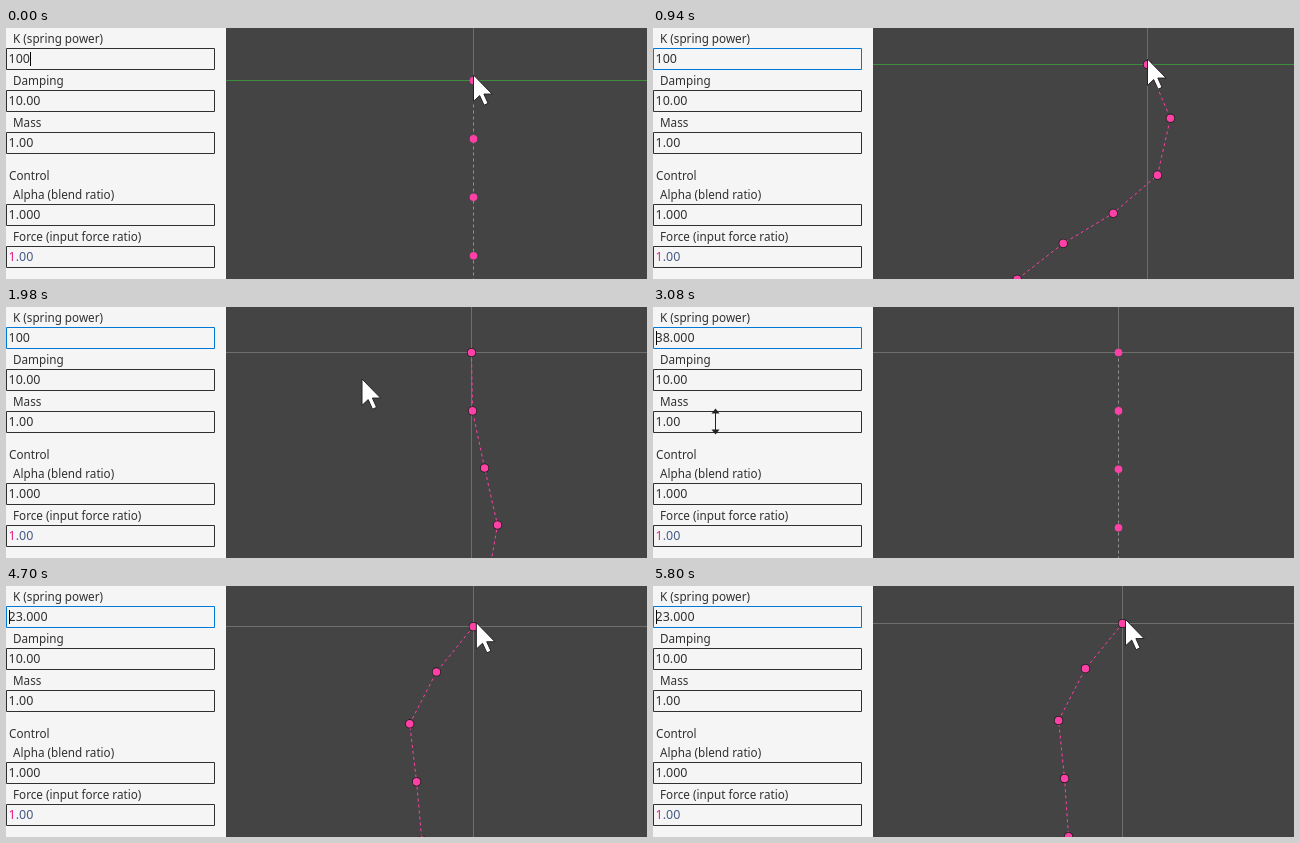
Write an HTML page with a canvas that moves like this. It is 641 px wide and 251 px high and loops after 5.88 s.

```html
<!DOCTYPE html>
<html lang="en">
<head>
<meta charset="utf-8">
<title>Spring chain</title>
<style>
html, body { margin: 0; width: 100%; height: 100%; overflow: hidden; background: #444; }
canvas { display: block; }
</style>
</head>
<body>
<canvas id="stage" width="641" height="251"></canvas>
<script>
const ctx = document.getElementById('stage').getContext('2d');
const W = 641, H = 251, PANEL = 220, LOOP = 5880, FRAME = 73.5;
const LINK = 58.4;
const PINK = '#ff40a6', GREY = '#6e6e6e', GREEN = '#3f8c3f', DARK = '#444444';
const INK = '#303030', PAPER = '#f5f5f5';

// time, handle x, handle y, then the angle of each link from vertical (degrees)
const CHAIN = [
  [0, 467, 52],
  [330, 370, 48, 55, 45, 20, 5, 0],
  [700, 522, 38, -38, -55, -55, -45, -30],
  [940, 494, 36, 23.1, -12.8, -49.2, -59, -52],
  [1250, 385, 42, 57, 45, 10, -20, -30],
  [1600, 515, 45, -48, -35, 10, 25, 20],
  [1830, 465, 45, 15, -12, -25, -28, -30],
  [1980, 465, 45, 1, 11.9, 12.8, -10, -25],
  [2160, 465, 45, -1, -5, -3, 6, 10],
  [2380, 465, 45, 0, 2, 1, -2, -3],
  [2600, 465, 45],
  [3720, 465, 45],
  [3960, 415, 45, 25, 8, 1],
  [4180, 334, 43, 57.7, 53.3, 24.4, 7.9, 3.7],
  [4730, 468, 40, -40, -28, 6, 5, 3],
  [5280, 339, 37, 47, 40, -3, 0, 9],
  [5800, 469, 37, -39.4, -27.4, 5.9, 3.9, 2]
];

// time, x, y of the pointer while it is away from the handle
const POINTER = [
  [1830, 465, 40], [1980, 356, 72], [2350, 62, 30], [2480, 62, 30],
  [3080, 62, 114], [3220, 62, 134], [3310, 62, 134], [3720, 468, 41]
];

const value = (row, col) => row[col] || 0;

function slope(keys, i, col) {
  return (value(keys[i + 1], col) - value(keys[i], col)) / (keys[i + 1][0] - keys[i][0]);
}

// Flat at extremes and holds, smooth elsewhere
function tangent(keys, i, col) {
  if (i === 0 || i === keys.length - 1) return 0;
  const a = slope(keys, i - 1, col), b = slope(keys, i, col);
  return a * b <= 0 ? 0 : 2 * a * b / (a + b);
}

function sample(keys, t, col) {
  const last = keys.length - 1;
  if (t <= keys[0][0]) return value(keys[0], col);
  if (t >= keys[last][0]) return value(keys[last], col);
  let i = 0;
  while (keys[i + 1][0] <= t) i++;
  const span = keys[i + 1][0] - keys[i][0], u = (t - keys[i][0]) / span;
  const u2 = u * u, u3 = u2 * u;
  return (2 * u3 - 3 * u2 + 1) * value(keys[i], col)
    + (u3 - 2 * u2 + u) * span * tangent(keys, i, col)
    + (3 * u2 - 2 * u3) * value(keys[i + 1], col)
    + (u3 - u2) * span * tangent(keys, i + 1, col);
}

function rect(x, y, w, h, color) {
  ctx.fillStyle = color;
  ctx.fillRect(x, y, w, h);
}

function text(str, x, y, size, color = INK) {
  ctx.font = size + 'px "Noto Sans", sans-serif';
  ctx.fillStyle = color;
  ctx.fillText(str, x, y);
  return ctx.measureText(str).width;
}

function field(label, str, top, border = INK) {
  text(label, 7, top - 5, 11.7);
  ctx.strokeStyle = border;
  ctx.lineWidth = 1;
  ctx.strokeRect(0.5, top + 0.5, 208, 21);
  if (str) text(str, 2.5, top + 15, 12.5);
}

function caretVisible(t) {
  if (t >= 2560 && t < 3770) return true;
  const phase = t < 2560 ? t : t - 4300 + 1060;
  return phase % 1060 < 530;
}

function drawPanel(t, k) {
  const scrubbed = t > 2480;
  rect(0, 0, PANEL, H, PAPER);
  field('K (spring power)', scrubbed ? k.toFixed(3) : '100', 20, t < 60 ? INK : '#0078d7');
  field('Damping', '10.00', 62);
  field('Mass', '1.00', 104);
  text('Control', 3, 152, 11.7);
  field('Alpha (blend ratio)', '1.000', 176);
  field('Force (input force ratio)', '', 218);
  const w = text('1', 2.5, 233, 12.5, '#e0208c');
  text('.00', 2.5 + w, 233, 12.5, '#465a86');
  if (caretVisible(t)) rect(scrubbed ? 3 : 24, 24, 1, 14, '#000');
}

function drawChain(t, hx, hy) {
  const points = [[hx, hy]];
  let bend = 0;
  for (let i = 0; i < 6; i++) {
    const angle = sample(CHAIN, t, 3 + Math.min(i, 4)) * Math.PI / 180;
    const [x, y] = points[i];
    bend += Math.abs(angle);
    points.push([x + LINK * Math.sin(angle), y + LINK * Math.cos(angle)]);
  }
  const straight = bend < 0.01;
  const x = Math.round(hx), y = Math.round(hy);
  const verticalGreen = (t >= 60 && t < 1900) || (t >= 3700 && t < 4700);
  rect(PANEL, y, W - PANEL, 1, t < 1900 ? GREEN : GREY);
  rect(x, 0, 1, H, verticalGreen ? GREEN : GREY);
  if (straight) rect(x, y, 1, H - y, DARK);

  ctx.save();
  ctx.translate(0.5, 0.5);
  ctx.strokeStyle = straight ? '#929292' : PINK;
  ctx.lineWidth = 1;
  ctx.setLineDash([3, 3]);
  ctx.beginPath();
  points.forEach(p => ctx.lineTo(...p));
  ctx.stroke();
  const ringed = (t >= 60 && t < 2640) || t >= 4700;
  const dot = (p, r, color) => {
    ctx.fillStyle = color;
    ctx.beginPath();
    ctx.arc(p[0], p[1], r, 0, 7);
    ctx.fill();
  };
  for (const p of points) {
    if (ringed) dot(p, 4.6, '#1c1c1c');
    dot(p, 3.8, PINK);
  }
  ctx.restore();
}

function shape(points, x, y, scale) {
  ctx.beginPath();
  points.forEach(([px, py]) => ctx.lineTo(x + px * scale, y + py * scale));
  ctx.closePath();
}

function drawArrow(x, y) {
  shape([[0, 0], [0, 17], [4, 13.3], [6.8, 19.5], [9.4, 18.3], [6.7, 12.3], [12, 12.3]], x, y, 1.55);
  ctx.fillStyle = '#fff';
  ctx.strokeStyle = '#242424';
  ctx.lineWidth = 1;
  ctx.lineJoin = 'round';
  ctx.fill();
  ctx.stroke();
}

function drawResize(x, y) {
  rect(x, y - 11, 1, 23, '#222');
  for (const dir of [-1, 1]) {
    shape([[0, 13 * dir], [-4, 8 * dir], [4, 8 * dir]], x + 0.5, y + 0.5, 1);
    ctx.fill();
  }
}

function draw(t) {
  const hx = sample(CHAIN, t, 1), hy = sample(CHAIN, t, 2);
  let px = sample(POINTER, t, 1), py = sample(POINTER, t, 2);
  const k = Math.round(100 - Math.max(0, (t < 3310 ? py : 134) - 30) * 62 / 84);
  if (t < 1830) { px = hx + 0.5; py = hy - 5; }
  if (t >= 3720) { px = hx + 3.5; py = hy - 3.5; }

  rect(0, 0, W, H, DARK);
  drawChain(t, hx, hy);
  drawPanel(t, k);
  if (t >= 2400 && t <= 3310) drawResize(Math.round(px), Math.round(py));
  else drawArrow(px, py);
}

// Steps fall on a 20 ms clock
const stepStart = n => Math.floor(n * FRAME / 20) * 20;

function tick() {
  const t = performance.now() % LOOP;
  let n = Math.floor(t / FRAME);
  if (stepStart(n + 1) <= t) n++;
  draw(stepStart(Math.min(n, 79)));
  requestAnimationFrame(tick);
}
tick();
</script>
</body>
</html>
```
